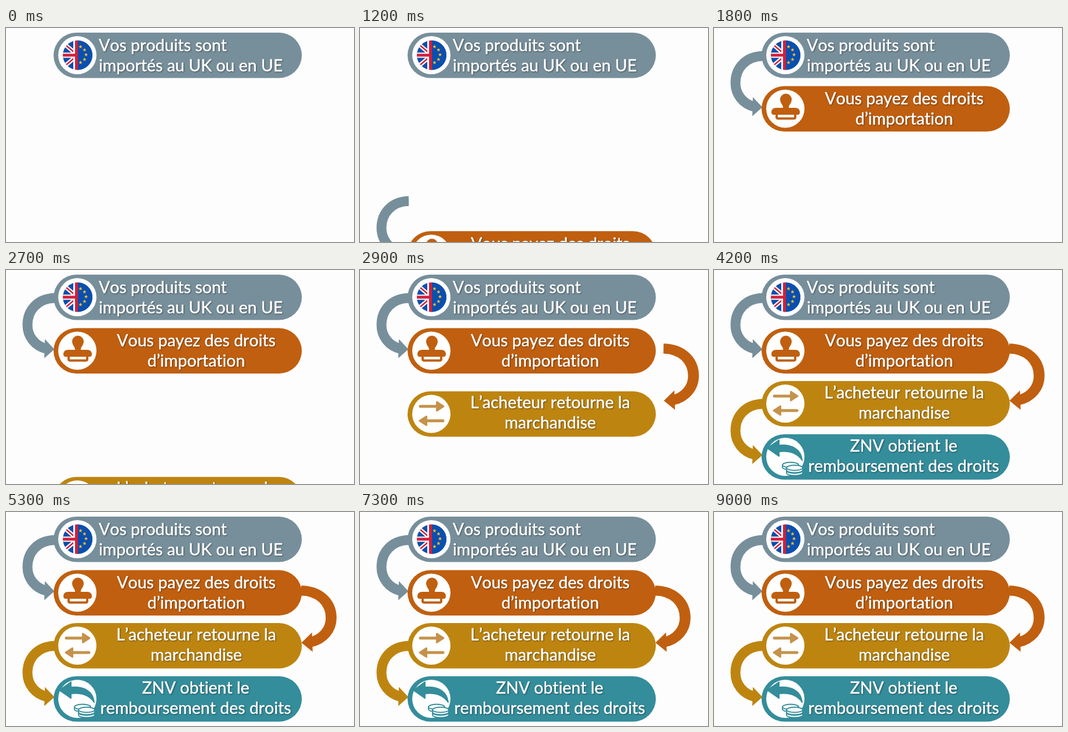
Write an HTML page that moves like this. It is 600 by 370 pixels and loops after 9100 ms.

```html
<!DOCTYPE html>
<html lang="fr">
<head>
<meta charset="utf-8">
<title>Remboursement des droits</title>
<style>
  html, body { margin: 0; width: 100%; height: 100%; overflow: hidden; background: #fefdfe; }
  svg { display: block; width: 600px; height: 370px; }
  text {
    font: 28.5px Lato, "Open Sans", sans-serif;
    font-kerning: none; font-variant-ligatures: none;
    fill: #fff; stroke: #fff; stroke-width: .5px;
    filter: drop-shadow(1.5px 1.5px 1px rgba(0, 0, 0, .45));
  }
  .centered { text-anchor: middle; }
  .line { fill: none; stroke: currentColor; stroke-linecap: round; stroke-linejoin: round; }
  .grey { color: #778f9b; }
  .orange { color: #c05f0f; }
  .gold { color: #bd8510; }
  .tan { color: #c4924a; }
  .teal { color: #348d9b; }
</style>
</head>
<body>
<svg viewBox="0 0 600 370">
  <defs>
    <g id="pill">
      <rect x="82" width="428" height="78.500" rx="39.250" fill="currentColor"/>
      <circle cx="123" cy="39" r="33" fill="#fff"/>
    </g>
    <g id="arrow">
      <path d="M84 48.5C55 49 37 69 37 95C37 115 50 131 69 136" fill="none" stroke="currentColor" stroke-width="17"/>
      <path d="M67 119.500L83.500 137L66 152.500Z" fill="currentColor"/>
    </g>
    <g id="swap" class="line">
      <path stroke-width="5" d="M-19.500 0H10"/>
      <path stroke-width="3" fill="currentColor" style="fill:currentColor" d="M9-7.500L20.500 0L9 7.500Z"/>
    </g>
    <path id="star" fill="#fbc02d" d="M0-3.300L.9-1H3.200L1.400.5L2 2.900L0 1.500L-2 2.900L-1.400.5L-3.200-1H-.9Z"/>
    <clipPath id="disc"><circle r="25.500"/></clipPath>
  </defs>

  <g class="grey" data-start="1040" data-dy="370"><use href="#arrow"/></g>
  <g class="orange" data-start="2425" data-dx="300">
    <use href="#arrow" transform="translate(601.300 86.500) scale(-1.1 1.018)"/>
  </g>
  <g class="gold" data-start="3600" data-dy="370"><use href="#arrow" y="183"/></g>

  <g class="grey">
    <use href="#pill" y="8"/>
    <g transform="translate(123.500 47)" clip-path="url(#disc)">
      <rect x="-26" y="-26" width="52" height="52" fill="#0b4fae"/>
      <g fill="none">
        <path d="M0 0L-26-22M0 0L-26 22" stroke="#fff" stroke-width="7"/>
        <path d="M0 0L-26-22M0 0L-26 22" stroke="#d3203a" stroke-width="2.500"/>
        <path d="M-26 0H0M-3-26V26" stroke="#fff" stroke-width="9"/>
        <path d="M-26 0H0M-2-26V26" stroke="#d3203a" stroke-width="5"/>
      </g>
      <path d="M.5-26H26V26H.5Z" fill="#0b4fae"/>
      <g id="stars"></g>
    </g>
    <text x="160" y="40">Vos produits sont</text>
    <text x="160" y="75">importés au UK ou en UE</text>
  </g>

  <g class="orange" data-start="1040" data-dy="370">
    <use href="#pill" y="100.500"/>
    <path fill="currentColor" d="M119 138C120 134 114 130 114 123.500A10 10 0 0 1 134 123.500C134 130 128 134 129 138H140Q148 138 148 146Q148 150 144 150H103Q99 150 99 146Q99 138 107 138Z"/>
    <path class="line" stroke-width="4" d="M108 151V154Q108 156.500 111 156.500H137Q140 156.500 140 154V151"/>
    <g class="centered">
      <text x="328" y="132">Vous payez des droits</text>
      <text x="328" y="167">d’importation</text>
    </g>
  </g>

  <g class="gold" data-start="2425" data-dy="370">
    <use href="#pill" y="192"/>
    <g class="tan">
      <use href="#swap" transform="translate(123.500 218)"/>
      <use href="#swap" transform="translate(123.500 243) scale(-1 1)"/>
    </g>
    <g class="centered">
      <text x="328" y="221.500">L’acheteur retourne la</text>
      <text x="328" y="256.500">marchandise</text>
    </g>
  </g>

  <g class="teal" data-start="3600" data-dy="370">
    <use href="#pill" y="284"/>
    <path fill="currentColor" stroke="currentColor" stroke-width="2" stroke-linejoin="round" d="M92 308L112 294V303C136 301 150 311 152 329C144 317 132 312 112 314V322Z"/>
    <g id="coins" fill="#fff" stroke="currentColor" stroke-width="1.800"></g>
    <g class="centered">
      <text x="327" y="314">ZNV obtient le</text>
      <text x="327" y="349">remboursement des droits</text>
    </g>
  </g>
</svg>
<script>
const LOOP = 9100, FLY = 500;
const movers = [...document.querySelectorAll('[data-start]')];

document.getElementById('stars').innerHTML = [-70, -35, 0, 35, 70].map(deg => {
  const a = deg * Math.PI / 180;
  return `<use href="#star" x="${14.5 * Math.cos(a)}" y="${-1 + 14.5 * Math.sin(a)}"/>`;
}).join('');

const coin = (x, y) =>
  `<path d="M${x - 14} ${y}v4a14 4.500 0 0 0 28 0v-4"/><ellipse cx="${x}" cy="${y}" rx="14" ry="4.500"/>`;
document.getElementById('coins').innerHTML =
  coin(132, 337) + coin(139, 347) + coin(139, 342);

// Each part flies in at constant speed from below or from the right.
function draw(now) {
  const t = now % LOOP;
  for (const part of movers) {
    const { start, dx = 0, dy = 0 } = part.dataset;
    const left = 1 - Math.min(1, Math.max(0, (t - start) / FLY));
    part.setAttribute('transform', `translate(${dx * left} ${dy * left})`);
  }
}

const origin = performance.now();
function tick() {
  draw(performance.now() - origin);
  requestAnimationFrame(tick);
}
tick();
</script>
</body>
</html>
```
